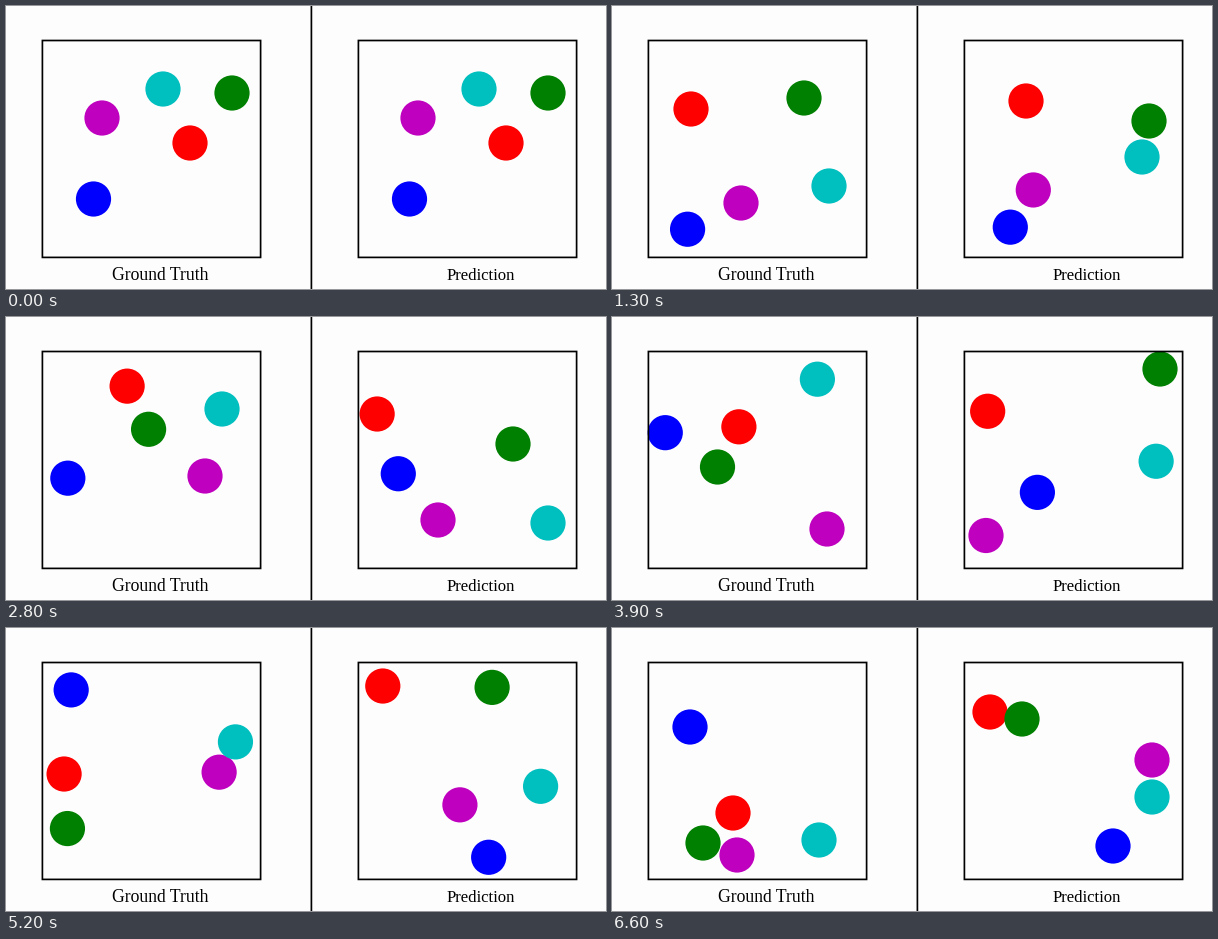
A matplotlib script that plays this animation: 600x283 px, repeating every 6.7 s.

```python
import numpy as np
import matplotlib.pyplot as plt
from matplotlib.animation import FuncAnimation
from matplotlib.patches import Circle, Rectangle

W, H, DPI = 600, 283, 100
FRAMES, STEP = 67, 100
RADIUS = 17.6
X_WALLS = (52.5, 237.5)
Y_WALLS = (51.5, 235)
PANEL_SHIFT = 316

COLORS = {"red": "#ff0000", "green": "#008000", "blue": "#0000ff",
          "magenta": "#bf00bf", "cyan": "#00bfbf"}
START = {"red": (184, 137), "green": (249, 87), "blue": (87.5, 193),
         "magenta": (96, 112), "cyan": (157, 83)}

# Balls fly straight between collisions (step, x, y); the last point is the end
# of the loop. Points past a wall are mirrored back, which makes the bounces.
TRUTH = {
    "red": [(13, 79, 103), (33.5, -51, 8.5), (66, 121, -82)],
    "green": [(13, 192, 92), (30, 136, 115), (66, 14, 255)],
    "blue": [(66, 27, 466)],
    "magenta": [(13, 129, 197), (28, 199, 311), (39, 215, 212),
                (49, 243, 123), (66, 350, 243)],
    "cyan": [(13, 217, 180), (28, 259, 92), (33.7, 286, 92),
             (57, 214, -39), (66, 207, -109)],
}
PREDICTION = {
    "red": [(13, 98, 95), (31.2, 46, -13), (66, 43, 84)],
    "green": [(13, 221, 115), (28, 191, 127), (39, 232, 52),
              (46.5, 275, 25), (66, 381, 91)],
    "blue": [(31.2, 75, 327), (58.2, 194, 215), (66, 185, 252)],
    "magenta": [(28, 116, 267), (39, 47, 218.5), (66, -119, 132)],
    "cyan": [(13, 214, 151), (28, 226, 264), (43.5, 229, 351),
             (58.2, 211, 283), (66, 224, 301)],
}


def fold(v, walls):
    """Reflect an unbounded coordinate between two walls."""
    lo, hi = walls
    span = hi - lo
    return lo + span - abs((v - lo) % (2 * span) - span)


def position(path, n):
    t, x, y = np.transpose(path)
    return fold(np.interp(n, t, x), X_WALLS), fold(np.interp(n, t, y), Y_WALLS)


def px(size):
    return size * 72 / DPI


fig = plt.figure(figsize=(W / DPI, H / DPI), dpi=DPI, facecolor="#fefdfe")
ax = fig.add_axes([0, 0, 1, 1])
ax.set(xlim=(0, W), ylim=(H, 0))
ax.axis("off")

ax.plot([305.4, 305.4], [0, H], color="black", lw=px(1.7), snap=False)

balls = []
panels = [(0, TRUTH, "Ground Truth", 154, 17.6),
          (PANEL_SHIFT, PREDICTION, "Prediction", 475, 16.7)]
for shift, hits, label, label_x, size in panels:
    ax.add_patch(Rectangle((36.4 + shift, 34.5), 218.2, 216.9, fill=False,
                           ec="black", lw=px(1.7), zorder=3, snap=False))
    ax.text(label_x, 273.7, label, family="Liberation Serif", size=px(size),
            ha="center", va="baseline", color="black")
    for name, color in COLORS.items():
        ball = ax.add_patch(Circle((0, 0), RADIUS, fc=color, lw=0, zorder=2))
        balls.append((ball, [(0, *START[name])] + hits[name], shift))


def draw(n):
    for ball, path, shift in balls:
        x, y = position(path, n)
        ball.center = x + shift, y
    return [ball for ball, _, _ in balls]


anim = FuncAnimation(fig, draw, frames=FRAMES, interval=STEP,
                     repeat=True, repeat_delay=0)
plt.show()
```
